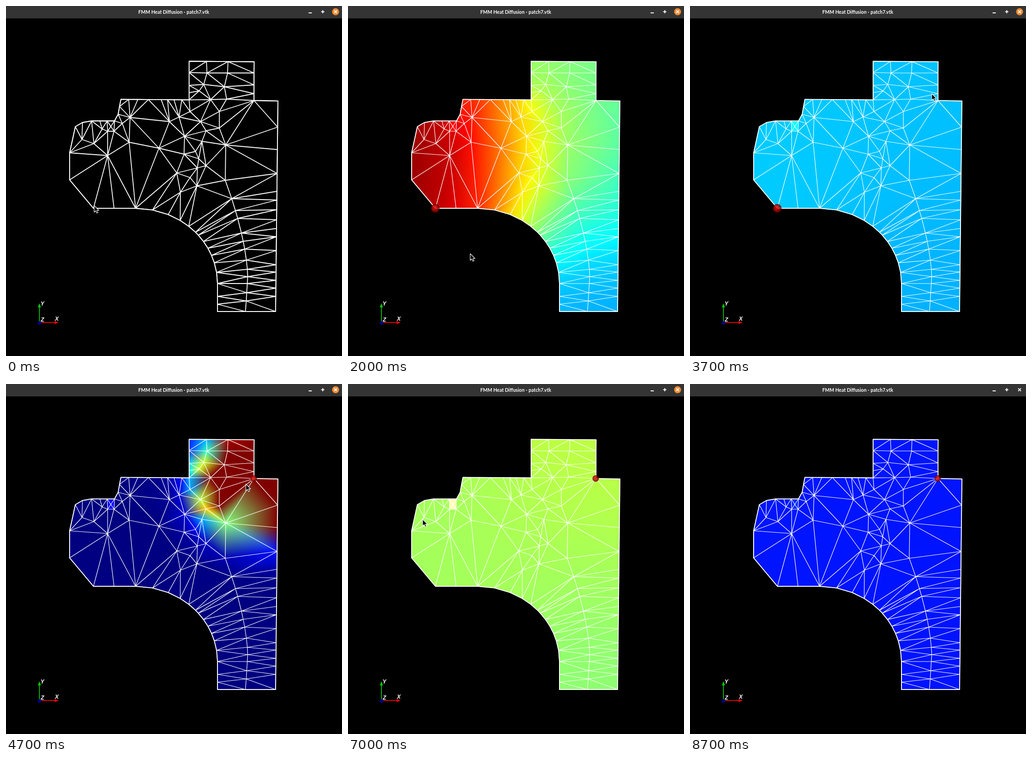
Write an HTML page with a canvas that moves like this. It is 734 px wide and 763 px high and loops after 8900 ms.

```html
<!DOCTYPE html>
<html lang="en">
<head>
<meta charset="utf-8">
<title>FMM Heat Diffusion</title>
<style>
  html, body { margin: 0; width: 100%; height: 100%; overflow: hidden; background: #000; }
  canvas { display: block; }
</style>
</head>
<body>
<canvas id="view" width="734" height="763"></canvas>
<script>
const ctx = document.getElementById('view').getContext('2d');
const LOOP = 8900;
const clamp = v => Math.max(0, Math.min(1, v));

// ---- Plate: rim, spine of the leg, and inner nodes ----
const arcPoint = deg => {
  const a = deg * Math.PI / 180;
  return [283 + 179 * Math.sin(a), 605 - 164 * Math.cos(a)];
};
const spinePoint = y => [y < 590 ? 528 - 49 * ((590 - y) / 210) ** 1.6 : 528 - (y - 590) * .06, y];

const rim = [
  [191, 441], [139, 379], [139, 320], [151.5, 263], [167, 254],
  ...[187, 205, 221, 237].map(x => [x, 250.5]),
  [245, 236], [248, 219],
  ...[251, 268, 288, 311, 339, 353, 367, 384, 400].map(x => [x, 203.5 + (x - 251) * .007]),
  ...[189, 173, 145].map(y => [400, y]),
  ...[400, 438, 485, 542].map(x => [x, 120.5 + (x - 400) * .007]),
  ...[146, 172, 191, 206].map(y => [541.7, y]),
  ...[207, 264, 313, 365, 404, 423, 444, 466, 485, 503, 533, 564, 580, 598, 615, 633, 666]
    .map(y => [594 - (y - 207) * .011, y]),
  [523, 666],
  ...[666, 650, 633].map(y => [462, y]),
  ...[90, 81.5, 74, 68, 62, 56, 50, 47, 40.5, 33, 23.5, 12, 0].map(arcPoint),
  [236, 441]
];
const nodes = [
  ...rim,
  ...[380, 420, 446, 463, 495, 513, 530, 554, 574, 590, 605, 625, 643].map(spinePoint),
  [166, 291], [192, 300], [210, 268], [222, 273], [236, 273], [222, 326], [254, 256], [271, 243], [269, 297],
  [334, 310], [357, 252], [378, 242], [402, 230], [390, 284], [389, 323], [373, 364], [402, 374], [381, 406],
  [417, 392], [418, 353], [437, 348], [421, 333], [414, 317], [428, 295], [437, 272], [425, 252], [466, 266],
  [466, 230], [480, 303], [447, 204], [482, 203], [422, 185], [432, 171], [477, 176], [439, 146], [484, 146]
];

function polygon(points, path = new Path2D()) {
  points.forEach(([x, y], i) => i ? path.lineTo(x, y) : path.moveTo(x, y));
  path.closePath();
  return path;
}
const outline = polygon(rim);

const cross = (a, b, c) => (b[0] - a[0]) * (c[1] - a[1]) - (b[1] - a[1]) * (c[0] - a[0]);
const dot = (a, b, c) => (b[0] - a[0]) * (c[0] - a[0]) + (b[1] - a[1]) * (c[1] - a[1]);

// Slopes of the plane through three values at a, b, c
function slope([a, b, c], [u, v, w]) {
  const n = cross(a, b, c);
  return [((v - u) * (c[1] - a[1]) - (w - u) * (b[1] - a[1])) / n,
          ((w - u) * (b[0] - a[0]) - (v - u) * (c[0] - a[0])) / n];
}

// Delaunay test: no node lies inside the circle through the corners
function emptyCircle(a, b, c) {
  const [x, y] = slope([a, b, c], [0, dot(a, b, b) / 2, dot(a, c, c) / 2]);
  const r2 = (x * x + y * y) * (1 - 1e-9);
  return nodes.every(p => (p[0] - a[0] - x) ** 2 + (p[1] - a[1] - y) ** 2 >= r2);
}

const triangles = [];
for (let i = 0; i < nodes.length; i++)
  for (let j = i + 1; j < nodes.length; j++)
    for (let k = j + 1; k < nodes.length; k++) {
      const [a, b, c] = [nodes[i], nodes[j], nodes[k]];
      if (Math.abs(cross(a, b, c)) < 8 || !emptyCircle(a, b, c)) continue;
      if (ctx.isPointInPath(outline, (a[0] + b[0] + c[0]) / 3, (a[1] + b[1] + c[1]) / 3))
        triangles.push([i, j, k]);
    }
const mesh = new Path2D();
triangles.forEach(tri => polygon(tri.map(i => nodes[i]), mesh));

// ---- Heat equation on the mesh, insulated rim ----
const mass = nodes.map(() => 1e-6);
const links = nodes.map(() => new Map());
for (const tri of triangles)
  tri.forEach((i, n) => {
    const j = tri[(n + 1) % 3], k = tri[(n + 2) % 3];
    const area2 = Math.abs(cross(nodes[i], nodes[j], nodes[k]));
    const w = dot(nodes[i], nodes[j], nodes[k]) / area2 / 2;
    mass[i] += area2 / 6;
    links[j].set(k, (links[j].get(k) || 0) + w);
    links[k].set(j, (links[k].get(j) || 0) + w);
  });
const near = links.map(l => [...l].filter(([, w]) => w > 0));
const total = mass.reduce((a, b) => a + b);

function diffuse(start, spread) {
  const steps = 60, dt = spread / steps;
  const u = nodes.map((_, i) => i === start ? 1 / mass[i] : 0);
  for (let s = 0; s < steps; s++) {
    const old = u.slice();
    for (let sweep = 0; sweep < 25; sweep++)
      for (let i = 0; i < u.length; i++) {
        let sum = mass[i] * old[i], weight = mass[i];
        for (const [j, w] of near[i]) {
          sum += dt * w * u[j];
          weight += dt * w;
        }
        u[i] = sum / weight;
      }
  }
  return u;
}

function heatAt(source, t) {
  const age = (t - source.start) / 1000;
  const u = diffuse(nodes.findIndex(p => Math.hypot(p[0] - source.x, p[1] - source.y) < 2), 26000 * age ** 1.35);
  const mean = u.reduce((sum, v, i) => sum + v * mass[i], 0) / total;
  const level = source.level * Math.exp(-((age / 3.47) ** 3));
  return u.map(v => v * level / mean);
}

const jet = v => [3, 2, 1].map(c => clamp(1.5 - Math.abs(4 * clamp(v) - c)));

// Each colour channel is linear across a triangle, so it is one linear gradient
function channelFill(corners, values, color) {
  const [gx, gy] = slope(corners, values), g2 = gx * gx + gy * gy;
  if (g2 < 1e-9) return color(values[0]);
  const at = v => [corners[0][0] + gx * (v - values[0]) / g2, corners[0][1] + gy * (v - values[0]) / g2];
  const fill = ctx.createLinearGradient(...at(0), ...at(1));
  fill.addColorStop(0, color(0));
  fill.addColorStop(1, color(1));
  return fill;
}

function drawHeat(source, t) {
  const colors = heatAt(source, t).map(jet);
  ctx.save();
  ctx.clip(outline);
  ctx.globalCompositeOperation = 'lighter';
  for (const tri of triangles) {
    const corners = tri.map(i => nodes[i]), face = polygon(corners);
    for (let n = 0; n < 3; n++) {
      ctx.fillStyle = channelFill(corners, tri.map(i => colors[i][n]),
        v => `rgb(${[0, 1, 2].map(m => m === n ? Math.round(255 * v) : 0)})`);
      ctx.fill(face);
    }
  }
  ctx.restore();
}

// ---- Timing ----
// Spans in which the picture advances every 100 ms; it holds in between
const spans = [[0, 100], [600, 700], [900, 1500], [1700, 2400], [2900, 4200],
  [4600, 5500], [5700, 5800], [6000, 6000], [6200, 8100], [8700, 8700]];
const sources = [
  { x: 190.5, y: 441, r: 9.5, start: 600, level: .64 },
  { x: 541, y: 206, r: 7, start: 4600, level: .75 }
];
const pointer = [[0, 192.5, 435], [100, 223, 439], [600, 226, 441], [2000, 267, 540], [2900, 268.5, 542],
  [3700, 528, 191], [4200, 541, 206], [4600, 541, 206], [5500, 387, 315], [7000, 163, 295],
  [7900, 93, 7], [8100, 73, -20]];

function snap(t) {
  const [from, to] = spans.filter(s => s[0] <= t).pop();
  return Math.min(to, from + Math.floor((t - from) / 100) * 100);
}

function pointerAt(t) {
  const i = pointer.findIndex(k => k[0] > t), a = pointer[i - 1], b = pointer[i];
  const f = (t - a[0]) / (b[0] - a[0]);
  return [1, 2].map(n => a[n] + (b[n] - a[n]) * f);
}

// ---- Drawing ----
const arrow = new Path2D('M0 0V14.5L3.5 11.5 5.8 16.5 8.3 15.3 6 10.5H10.5Z');

function line(color, width, ...p) {
  ctx.strokeStyle = color;
  ctx.lineWidth = width;
  ctx.beginPath();
  for (let i = 0; i < p.length; i += 4) {
    ctx.moveTo(p[i], p[i + 1]);
    ctx.lineTo(p[i + 2], p[i + 3]);
  }
  ctx.stroke();
}

function shape(color, ...points) {
  ctx.fillStyle = color;
  ctx.fill(polygon(points));
}

function disc(x, y, r, fill) {
  ctx.fillStyle = fill;
  ctx.beginPath();
  ctx.arc(x, y, r, 0, 7);
  ctx.fill();
}

function drawBall({ x, y, r }) {
  const g = ctx.createRadialGradient(x - r * .2, y - r * .2, 0, x, y, r);
  g.addColorStop(0, 'rgba(235,20,10,.85)');
  g.addColorStop(.6, 'rgba(180,8,4,.85)');
  g.addColorStop(1, 'rgba(80,0,0,.85)');
  disc(x, y, r, g);
}

function drawBar(hover) {
  ctx.fillStyle = '#343434';
  ctx.fillRect(0, 0, 734, 27);
  ctx.fillStyle = '#fff';
  ctx.font = 'bold 10.5px Lato, "Open Sans", sans-serif';
  ctx.textAlign = 'center';
  ctx.fillText('FMM Heat Diffusion - patch7.vtk', 366.5, 16.5);
  line('#fff', 2, 661, 15, 668, 15);
  line('#fff', 1.8, 688.5, 12.5, 695.5, 12.5, 692, 9, 692, 16);
  if (hover) disc(720, 12.5, 7.7, '#ee8a30');
  line('#fff', 1.8, 717, 9.5, 723, 15.5, 723, 9.5, 717, 15.5);
}

function drawAxes() {
  line('#00b400', 2, 73, 690, 73, 656);
  shape('#00c800', [73, 648], [76.5, 657], [69.5, 657]);
  line('#dc0000', 2, 73, 690, 107, 690);
  shape('#f00000', [115, 690], [106, 686.5], [106, 693.5]);
  disc(73, 691, 4, '#000082');
  ctx.fillStyle = '#fff';
  ctx.font = 'italic bold 12px "Liberation Sans", Arial, sans-serif';
  ctx.textAlign = 'left';
  ctx.fillText('Y', 75.5, 653);
  ctx.fillText('X', 107, 686);
  ctx.fillText('Z', 76, 688);
}

function drawPointer(t) {
  ctx.save();
  ctx.translate(...pointerAt(t));
  ctx.fillStyle = '#000';
  ctx.fill(arrow);
  ctx.strokeStyle = '#fff';
  ctx.lineWidth = 1.1;
  ctx.stroke(arrow);
  ctx.restore();
}

function draw(t) {
  const source = sources.filter(s => t >= s.start).pop();
  ctx.fillStyle = '#000';
  ctx.fillRect(0, 0, 734, 763);
  if (source) drawHeat(source, t);
  ctx.lineJoin = 'round';
  ctx.strokeStyle = '#fff';
  ctx.lineWidth = source ? 1.2 : 1.8;
  ctx.stroke(mesh);
  ctx.lineWidth = 1.9;
  ctx.stroke(outline);
  if (source) drawBall(source);
  drawAxes();
  drawBar(t < 8700);
  if (t < 8100) drawPointer(t);
}

let shown = -1;
function tick() {
  const t = snap(performance.now() % LOOP);
  if (t !== shown) draw(shown = t);
  requestAnimationFrame(tick);
}
tick();
</script>
</body>
</html>
```
